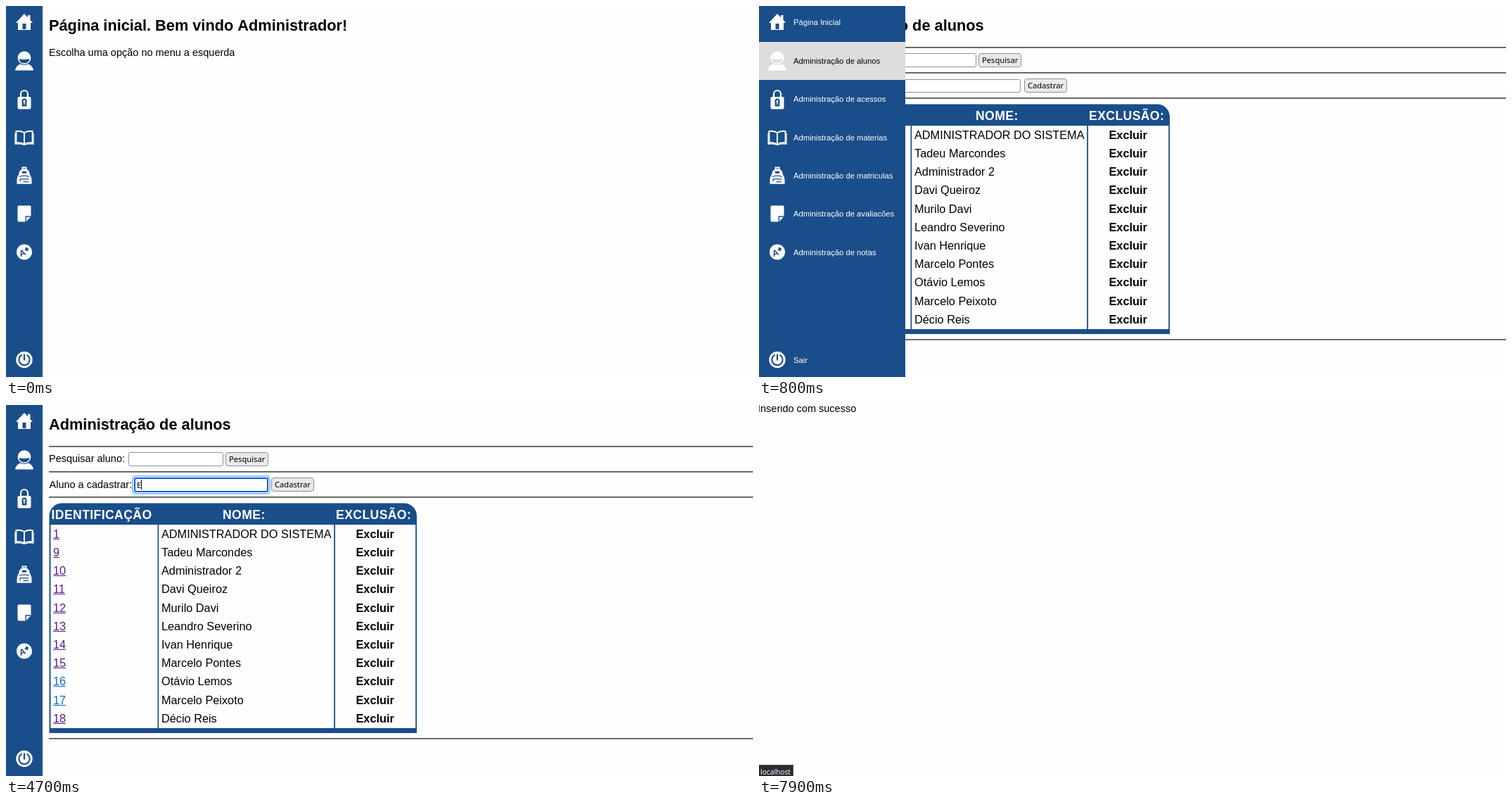
An HTML page with a canvas for the animation above (8000 ms loop, 1062x527 px).

```html
<!DOCTYPE html>
<html lang="pt">
<head>
<meta charset="utf-8">
<title>Administração de alunos</title>
<style>
html, body { margin: 0; width: 100%; height: 100%; overflow: hidden; background: #fefefe; }
canvas { display: block; }
</style>
</head>
<body>
<canvas id="stage" width="1062" height="527"></canvas>
<script>
const ctx = document.getElementById('stage').getContext('2d');
const W = 1062, H = 527, LOOP = 8000, STEP = 100;
const BLUE = '#1a4e8a', PAGE = '#fefefe', MENU_MIN = 52, MENU_MAX = 208;
const ARIAL = '"Liberation Sans", Arial, sans-serif';
const UI = '"Noto Sans", "Open Sans", sans-serif';
const FIELD_FONT = '11.2px ' + UI;

const menu = [
  ['Página Inicial', 23], ['Administração de alunos', 77.5],
  ['Administração de acessos', 132], ['Administração de materias', 186.5],
  ['Administração de matriculas', 240.7], ['Administração de avaliacões', 295],
  ['Administração de notas', 349.5], ['Sair', 502.5]
];
const students = [
  [1, 'ADMINISTRADOR DO SISTEMA'], [9, 'Tadeu Marcondes'], [10, 'Administrador 2'],
  [11, 'Davi Queiroz'], [12, 'Murilo Davi'], [13, 'Leandro Severino'],
  [14, 'Ivan Henrique'], [15, 'Marcelo Pontes'], [16, 'Otávio Lemos'],
  [17, 'Marcelo Peixoto'], [18, 'Décio Reis']
];
const typed = 'Elisio fontes';
// [time, value] pairs; the last one reached applies
const typing = [[0, 0], [4200, 1], [4800, 2], [5200, 3], [5400, 4], [5500, 5], [5700, 6],
  [6000, 7], [6300, 8], [6400, 9], [6500, 10], [6600, 12], [6700, 13]];
const caret = [[0, 0], [2200, 1], [2700, 0], [3200, 1], [3700, 0], [4700, 1], [7100, 0]];
const menuWidth = [[0, MENU_MIN], [500, 104], [600, 188], [700, MENU_MAX], [900, 110], [1000, MENU_MIN]];

const at = (keys, t) => keys.reduce((v, k) => t >= k[0] ? k[1] : v, 0);
const within = (t, a, b) => t >= a && t < b;

function rect(x, y, w, h, color) {
  ctx.fillStyle = color;
  ctx.fillRect(x, y, w, h);
}

function box(x, y, w, h, r, fill, stroke, line = 1) {
  ctx.beginPath();
  ctx.roundRect(x, y, w, h, r);
  if (fill) { ctx.fillStyle = fill; ctx.fill(); }
  if (stroke) { ctx.strokeStyle = stroke; ctx.lineWidth = line; ctx.stroke(); }
}

function text(str, x, y, font, color = '#000', spacing = 0) {
  ctx.font = font;
  ctx.letterSpacing = spacing + 'px';
  ctx.fillStyle = color;
  ctx.fillText(str, x, y);
}

function shape(d, color) {
  ctx.fillStyle = color;
  ctx.fill(new Path2D(d));
}

function line(d, color, width) {
  ctx.strokeStyle = color;
  ctx.lineWidth = width;
  ctx.stroke(new Path2D(d));
}

function disc(x, y, r, color) {
  ctx.fillStyle = color;
  ctx.beginPath();
  ctx.arc(x, y, r, 0, Math.PI * 2);
  ctx.fill();
}

// Each icon is drawn around its own centre; "cut" is the colour behind it
const icons = [
  cut => {
    shape('M-12 1 L0 -12 L5 -6.7 V-10 H8.5 V-3 L12 1 H9 V11 H-9 V1 Z', '#fff');
    rect(-2.5, 2, 5, 8, cut);
  },
  cut => {
    shape('M-13 14 Q-12 7.5 -6 5 H6 Q12 7.5 13 14 Z', '#fff');
    disc(0, -3.8, 10.4, cut);
    disc(0, -3.8, 9.4, '#fff');
    shape('M-7.6 -2.6 Q0 -0.6 7.6 -2.6 Q6.4 3.6 0 3.8 Q-6.4 3.6 -7.6 -2.6 Z', cut);
  },
  cut => {
    line('M-5 -2 V-7 A5 5 0 0 1 5 -7 V-2', '#fff', 2.2);
    box(-9.5, -3, 19, 17.5, 2, '#fff');
    disc(0, 3, 3.6, cut);
    rect(-3.3, 4, 6.6, 6.5, cut);
    disc(0, 3.2, 1.5, '#fff');
    rect(-0.7, 4, 1.4, 4, '#fff');
  },
  () => {
    line('M0 -6.5 Q-5 -9.5 -11.6 -8.5 V8 Q-5 7 0 10 Q5 7 11.6 8 V-8.5 Q5 -9.5 0 -6.5 V9', '#fff', 2);
    line('M-13 -6 V9.6 Q-5 9 0 11 Q5 9 13 9.6 V-6', '#fff', 1.2);
  },
  cut => {
    line('M-2.6 -8 V-11.3 H2.6 V-8', '#fff', 1.8);
    shape('M-10.5 12 V6 Q-10 1 -8 -1 Q-7.5 -9.5 0 -9.5 Q7.5 -9.5 8 -1 Q10 1 10.5 6 V12 Z', '#fff');
    box(-3.2, -6, 6.4, 3, 1, cut);
    line('M-7 1.8 Q0 -1 7 1.8 M-6.5 5.2 H6.5 M-6 5.2 V8.5 M-1.5 9 H6', cut, 1.2);
  },
  cut => {
    shape('M-7.5 -11.5 H8 Q9.5 -11.5 9.5 -10 V4 L2.5 11.5 H-7.5 Q-9.5 11.5 -9.5 9.5 V-10 Q-9.5 -11.5 -7.5 -11.5 Z', '#fff');
    line('M2.2 11.5 V4 H9.5', cut, 1.4);
  },
  cut => {
    disc(0, 0, 11, '#fff');
    ctx.rotate(-0.35);
    text('A', -7.5, 4.5, 'bold 12.5px ' + ARIAL, cut);
    line('M1.8 -2.5 H7.4 M4.6 -5.3 V0.3', cut, 2);
  },
  cut => {
    disc(0, 0, 11.7, '#fff');
    line('M-3.4 -6.8 A7.6 7.6 0 1 0 3.4 -6.8', cut, 2);
    line('M0 -8 V1', cut, 2.2);
  }
];

function drawMenu(width, hover) {
  ctx.save();
  ctx.beginPath();
  ctx.rect(0, 0, width, H);
  ctx.clip();
  rect(0, 0, width, H, BLUE);
  menu.forEach(([label, y], i) => {
    const active = i === hover;
    if (active) rect(0, 51, width, 54, '#ddd');
    ctx.save();
    ctx.translate(26, y);
    icons[i](active ? '#ddd' : BLUE);
    ctx.restore();
    if (width > MENU_MIN) text(label, 49, y + 4, '11.25px ' + ARIAL, active ? '#000' : '#fff');
  });
  ctx.restore();
}

function drawTitle(str) {
  text(str, 61, 34.5, 'bold 21.75px ' + ARIAL);
}

function drawHome() {
  drawTitle('Página inicial. Bem vindo Administrador!');
  text('Escolha uma opção no menu a esquerda', 61, 71, '14.5px ' + ARIAL);
}

function drawRule(y) {
  rect(61, y, W - 61, 1, '#555');
  rect(61, y + 1, W - 61, 1, '#808080');
}

function drawButton(label, x, y, state = 'idle') {
  const fill = { idle: '#e9e9ed', hover: '#d0d0d7', down: '#b1b1b9' }[state];
  box(x + .5, y + .5, 60, 19, 3.5, fill, state === 'idle' ? '#8f8f9d' : '#676774');
  text(label, x + 5, y + 14, FIELD_FONT);
}

function drawField(t) {
  const focused = within(t, 2200, 7600);
  if (focused) {
    box(179, 100, 197, 27, 5, '#99c0f3');
    box(181, 102, 193, 23, 4, '#fff');
    box(183, 104, 189, 19, 2, '#fff', '#0061e0', 2);
  } else {
    box(183.5, 104.5, 188, 18, 2, '#fff', within(t, 2100, 2200) ? '#676774' : '#8f8f9d');
  }
  const value = typed.slice(0, at(typing, t));
  text(value, 186, 117.5, FIELD_FONT);
  if (focused && at(caret, t)) {
    rect(Math.round(186 + ctx.measureText(value).width), 106, 1, 14, '#000');
  }
}

function drawTable() {
  box(61.5, 139.5, 522.5, 31, [18, 18, 0, 0], BLUE);
  rect(61.5, 169, 522.5, 297, BLUE);
  [[63.5, 152], [217.2, 249], [468, 114.2]].forEach(([x, w]) => rect(x, 170, w, 289, PAGE));
  [['IDENTIFICAÇÃO', 64.5], ['NOME:', 308], ['EXCLUSÃO:', 469]].forEach(([s, x]) =>
    text(s, x, 162, 'bold 17.6px ' + ARIAL, '#fff', 0.4));
  const font = '16.3px ' + ARIAL;
  students.forEach(([id, name], i) => {
    const y = 188.7 + 26.22 * i;
    const color = id === 16 || id === 17 ? '#0a6acb' : '#551a8b';
    text(id, 67, y, font, color);
    rect(67, Math.round(y + 1), ctx.measureText(id).width, 1, color);
    text(name, 221, y, font);
    text('Excluir', 497.5, y, 'bold ' + font);
  });
}

function drawStudents(t) {
  drawTitle('Administração de alunos');
  [58, 94, 130, 473].forEach(drawRule);
  text('Pesquisar aluno:', 61, 81, '14.5px ' + ARIAL);
  box(174.5, 67.5, 134, 19, 2, '#fff', '#8f8f9d');
  drawButton('Pesquisar', 312, 67);
  text('Aluno a cadastrar:', 61.5, 118, '14.5px ' + ARIAL);
  drawTable();
  drawField(t);
  drawButton('Cadastrar', 377, 103, t < 7500 ? 'idle' : within(t, 7600, 7700) ? 'down' : 'hover');
  if (within(t, 4900, 5500)) {
    box(183.5, 124.5, 190, 18, 0, '#fff', '#c8c8cc');
    text('Elio prates', 187, 137.5, FIELD_FONT);
  }
}

function drawStatus(str) {
  ctx.font = '10.2px ' + UI;
  ctx.letterSpacing = '0px';
  const w = Math.round(ctx.measureText(str).width) + 6;
  rect(0, 511, w, 16, '#55545c');
  rect(0, 512, w - 1, 15, '#2b2a33');
  text(str, 2, 524.5, '10.2px ' + UI, '#fbfbfe');
}

function draw(t) {
  rect(0, 0, W, H, PAGE);
  if (t >= 7900) {
    text('Inserido com sucesso', -2, 10, '14.5px ' + ARIAL);
  } else {
    if (t < 800) drawHome(); else drawStudents(t);
    drawMenu(at(menuWidth, t), within(t, 500, 900) ? 1 : -1);
  }
  if (within(t, 600, 800)) drawStatus('localhost/20221118oficial_2/aluno/form_aluno.php');
  if (t >= 7800) drawStatus('localhost');
}

const start = performance.now();
function tick() {
  const t = (performance.now() - start) % LOOP;
  draw(Math.floor(t / STEP) * STEP);
  requestAnimationFrame(tick);
}
tick();
</script>
</body>
</html>
```
